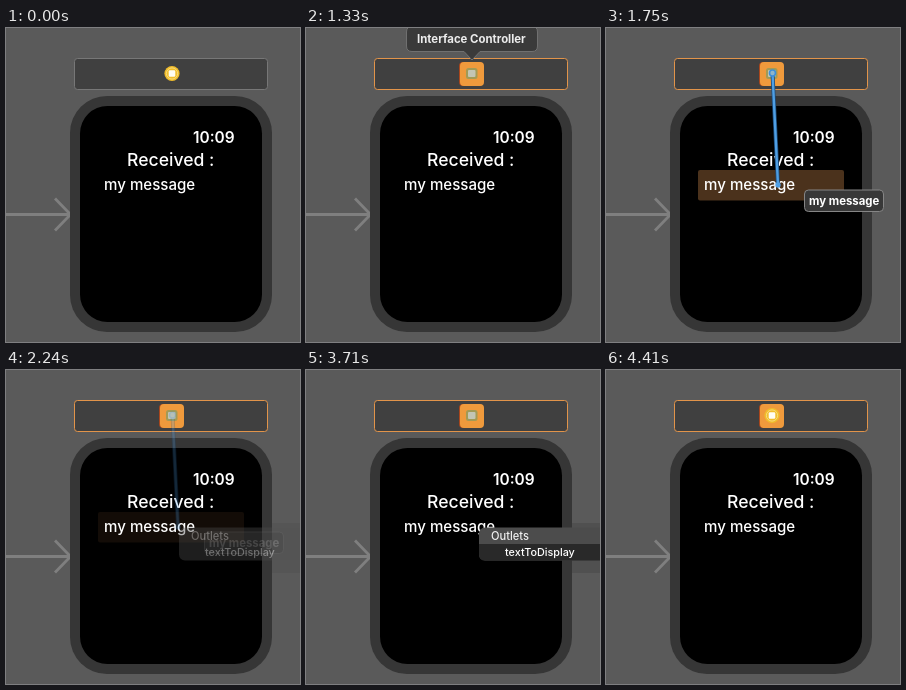
An HTML page for the animation above (5.46 s loop, 294x314 px).

```html
<!DOCTYPE html>
<html>
<head>
<meta charset="utf-8">
<style>
  html, body { margin: 0; width: 100%; height: 100%; overflow: hidden; background: #5a5a5a; }
  svg { display: block; width: 294px; height: 314px; font-family: Inter, Roboto, sans-serif; font-weight: 500; fill: #fff; }
  .bold { font-weight: 700; font-size: 11.4px; }
</style>
</head>
<body>
<svg viewBox="0 0 294 314">
  <rect width="294" height="314" fill="#5a5a5a"/>
  <path d="M0 186.5H64M49 170.5L64.5 186.5L49 202.5" fill="none" stroke="#7f7f7f" stroke-width="2.8"/>

  <rect x="64" y="68" width="202" height="236" rx="37" fill="#363636"/>
  <rect x="74" y="78" width="182" height="216" rx="27.5" fill="#000"/>
  <rect id="labelGlow" x="92" y="142" width="146" height="30.5" rx="2" fill="#4b321c"/>
  <text x="187" y="115" font-size="15.4" font-weight="600">10:09</text>
  <text x="121" y="138" font-size="17.6">Received :</text>
  <text x="98" y="162" font-size="15.1">my message</text>

  <rect id="bar" x="68.5" y="30.5" width="193" height="31" rx="3" fill="#404040"/>
  <g id="tile">
    <rect x="153" y="34" width="24" height="24" rx="4" fill="#a9471c"/>
    <rect x="154" y="34" width="24" height="24" rx="4" fill="#ef9a3c"/>
  </g>
  <g id="dimIcon">
    <rect x="160" y="40" width="11.5" height="11" rx="2.5" fill="#a29a55"/>
    <rect x="162" y="42" width="7.5" height="7" rx="1" fill="#c3c5b4"/>
  </g>
  <g id="icon">
    <circle cx="166" cy="45.5" r="7.6" fill="#f1bd2b"/>
    <circle cx="166" cy="45.5" r="5.6" fill="none" stroke="#f8dc7c"/>
    <rect x="162.7" y="42.2" width="6.6" height="6.6" rx="1.2" fill="#fffdf2"/>
  </g>

  <g id="hint">
    <path d="M106 -1.5H226Q231.5 -1.5 231.5 4V18Q231.5 23.5 226 23.5H174L166 32L158 23.5H106Q100.5 23.5 100.5 18V4Q100.5 -1.5 106 -1.5Z" fill="#3a3a3a" stroke="#707070"/>
    <text class="bold" x="111" y="15" fill="#ececec">Interface Controller</text>
  </g>

  <g id="drag" fill="none">
    <path id="edge" stroke="#1c4a78" stroke-width="4" stroke-linecap="round"/>
    <path id="wire" stroke="#4f9fe4" stroke-width="2.4" stroke-linecap="round"/>
    <circle cx="166.5" cy="45" r="3" fill="#8fb5c9" stroke="#3d8fd8" stroke-width="1.6"/>
    <circle id="dot" r="2.7" fill="#4f9fe4"/>
  </g>
  <g id="tip">
    <rect x="198.5" y="162" width="79" height="21.5" rx="4" fill="#383838" stroke="#858585"/>
    <text class="bold" x="203" y="177">my message</text>
  </g>

  <g id="menu">
    <rect x="266" y="153" width="28" height="50" fill="#505050"/>
    <rect x="173" y="157.5" width="140" height="33" rx="6" fill="#4c4c4c"/>
    <path id="row" d="M173 174H294V190.5H179Q173 190.5 173 184.5Z" fill="#292929"/>
    <text x="185" y="170" font-size="11.1" fill="#f0f0f0">Outlets</text>
    <text x="199" y="186" font-size="10.8">textToDisplay</text>
  </g>
</svg>
<script>
const LOOP = 5460, STEP = 70;
const el = id => document.getElementById(id);
const ramp = (t, a, b) => Math.min(1, Math.max(0, (t - a) / (b - a)));
const fade = (id, value) => el(id).setAttribute('opacity', +value);

function draw(t) {
  const selected = t >= 1330;
  el('bar').setAttribute('stroke', selected ? '#e2944a' : '#777');
  fade('tile', selected);
  fade('dimIcon', selected && t < 4410);
  fade('icon', !selected || t >= 4410);
  fade('hint', t >= 700 && t < 1540);

  // The connection is pulled from the icon down to the label.
  const p = ramp(t, 1470, 1750), pull = p * (2 - p);
  const x = 166.5 + 5.5 * pull, y = 45 + 112 * pull;
  const line = `M166.5 45L${x} ${y}`;
  el('edge').setAttribute('d', line);
  el('wire').setAttribute('d', line);
  el('dot').setAttribute('cx', x);
  el('dot').setAttribute('cy', y);
  const release = 1 - ramp(t, 2030, 2310);
  fade('drag', t >= 1540 ? release : 0);
  const overLabel = y > 142 ? release : 0;
  fade('labelGlow', overLabel);
  fade('tip', overLabel);
  el('tip').setAttribute('transform', `translate(${x - 172} ${y - 157})`);

  fade('menu', ramp(t, 2100, 2450) * (1 - ramp(t, 3850, 4060)));
  fade('row', t >= 3710);
}

function tick() {
  const t = performance.now() % LOOP;
  draw(Math.floor(t / STEP) * STEP);
  requestAnimationFrame(tick);
}
tick();
</script>
</body>
</html>
```
